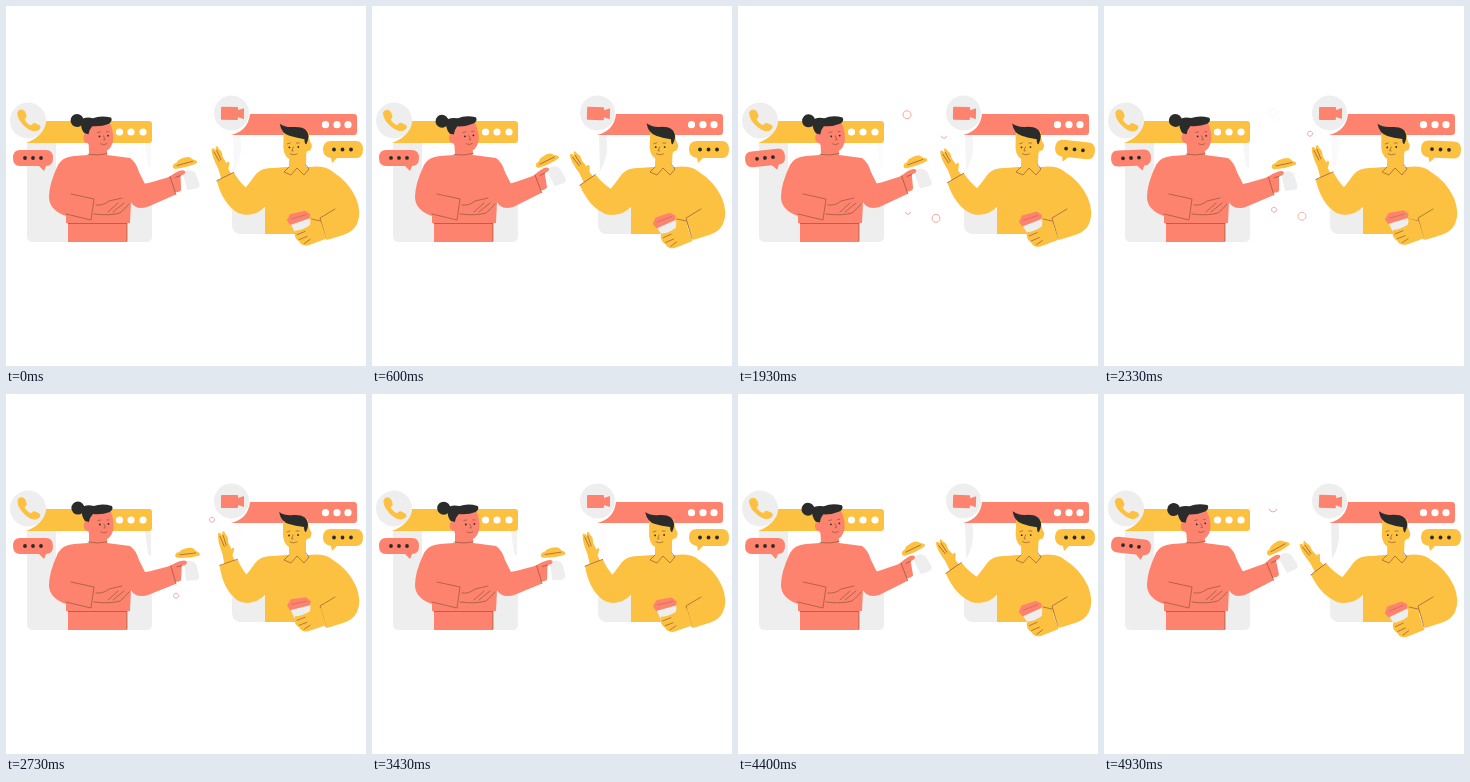
These frames come from a looping animation (360x360 px, 5000 ms). An HTML page:

```html
<!DOCTYPE html>
<html lang="en">
<head>
<meta charset="utf-8">
<title>Coffee call</title>
<style>
  html, body { margin: 0; width: 100%; height: 100%; overflow: hidden; background: #fff; }
  svg { display: block; width: 100vw; height: 100vh; }
  .yellow { fill: #fdc142; }
  .coral { fill: #fd836e; }
  .grey { fill: #eeeeee; }
  .white { fill: #fff; }
  .dark { fill: #2a2b2b; }
  .line { fill: none; stroke: #8a5236; stroke-width: .65; stroke-linecap: round; stroke-linejoin: round; }
  .spark { fill: none; stroke: #f7a79e; stroke-width: 1; }
</style>
</head>
<body>
<svg viewBox="0 0 360 360">
  <!-- call windows -->
  <path class="grey" d="M21 137H50V165H66V236H27Q21 236 21 230ZM122 192H146V230Q146 236 140 236H120Z"/>
  <path class="grey" d="M226 203H262V228H233Q226 226 226 219Z"/>
  <path id="sliver" class="grey" d="M227 129H234Q238 149 228 165Z"/>
  <path id="edge" class="grey" d="M139 137H145V162L142 160Z"/>

  <path class="yellow" d="M20 137Q37 131 40 115H143Q146 115 146 118V134Q146 137 143 137Z"/>
  <path class="coral" d="M225 129Q242 125 244 108H348Q351 108 351 111V126Q351 129 348 129Z"/>
  <g class="white">
    <circle cx="113.5" cy="126" r="3.6"/><circle cx="125" cy="126" r="3.6"/><circle cx="137" cy="126" r="3.6"/>
    <circle cx="319.5" cy="118.7" r="3.6"/><circle cx="331" cy="118.7" r="3.6"/><circle cx="342" cy="118.7" r="3.6"/>
  </g>

  <g id="phone">
    <circle class="grey" cx="22" cy="114.5" r="18"/>
    <path class="yellow" stroke="#fdc142" d="M14 104Q17 103 19 106L20 109Q21 111 18 113Q20 118 25 120Q27 117 29 118L33 120Q35 122 32 124Q27 127 20 121Q12 114 12 107Q12 105 14 104Z"/>
  </g>
  <g id="camera">
    <circle class="grey" cx="225.5" cy="107" r="17.5"/>
    <path class="coral" d="M216 101H231Q232 101 232 102V104L238 102V113L232 111V113Q232 114 231 114H216Q215 114 215 113V102Q215 101 216 101Z"/>
  </g>
  <g id="bubbleL">
    <path class="coral" d="M14 144H40Q47 144 47 152Q47 160 40 160L38 165L33 160H14Q7 160 7 152Q7 144 14 144Z"/>
    <g class="dark"><circle cx="19" cy="152" r="1.9"/><circle cx="27" cy="152" r="1.9"/><circle cx="35" cy="152" r="1.9"/></g>
  </g>
  <g id="bubbleR">
    <path class="yellow" d="M325 135H350Q357 135 357 143.500Q357 152 350 152H331L326 157L325 152Q317 151 317 143.500Q317 135 325 135Z"/>
    <g class="dark"><circle cx="328" cy="143.500" r="1.9"/><circle cx="336.500" cy="143.500" r="1.9"/><circle cx="345" cy="143.500" r="1.9"/></g>
  </g>

  <!-- woman -->
  <g id="armL">
    <g id="handL">
      <g id="cup">
        <path class="grey" d="M178 168Q188 166 191 172L193 183Q193 187 189 187H180Z"/>
        <path class="yellow" d="M174 158L176 156Q184 153 188 155L191 158Q195 159 194 162Q184 165 171 164Q168 162 171 159Z"/>
        <path class="line" d="M174 161L190 159.500"/>
      </g>
      <path class="coral" d="M162 173L170 169Q179 165 181 168Q182 171 176 172L175 186Q174 188 170 188L165 187Z"/>
      <path class="line" d="M171 173L176 172"/>
    </g>
    <path class="coral" d="M128 178Q138 179 145 177L165 172L170 190L142 201Q130 205 123 193Z"/>
    <path class="line" d="M165 172L170 190"/>
  </g>
  <path class="coral" d="M82 149H101L124 152Q130 156 133 166L139 178L142 200Q130 205 125 196L124 217H121V236H62V217H60V210Q43 204 43 191Q43 178 52 159Q56 151 68 150Z"/>
  <path class="line" d="M62 217.500H121M121 218V235M65 188L88 193L85 214L60 208M88 208Q104 210 114 207Q120 202 123 198M90 199Q97 200 103 195L116 192M102 206L112 197M107 206L118 197"/>
  <g id="headL">
    <path class="coral" d="M83 134V149Q92 153 101 149V144Z"/>
    <path class="line" d="M82 148Q92 150 101 148"/>
    <path class="coral" d="M81 118H105Q109 128 107 137Q104 146 97 146Q87 146 82 137Q77 136 78 130Q79 126 82 128Z"/>
    <circle class="dark" cx="72" cy="114" r="6.5"/>
    <path class="dark" d="M76 114Q79 110 88 112Q96 109 106 112Q108 115 104 118Q96 121 87 120Q84 123 83 128L79 127Q75 122 76 114Z"/>
    <circle class="dark" cx="94" cy="130.500" r=".9"/><circle class="dark" cx="102.500" cy="130" r=".9"/>
    <path class="line" d="M92 126.500L95 126M101 126L103 126M98 130L99.500 134L98 134M95 138Q98 140 101 138"/>
  </g>

  <!-- man -->
  <g id="armR">
    <path class="yellow" d="M219 171L217 159Q212 146 213 139Q215 137 217 141Q217 136 219 137L221 141Q223 141 223 148L226 155Q228 152 229 155L227 161L230 168Z"/>
    <path class="line" d="M215 142L219 152M218 141L221 151"/>
    <path class="yellow" d="M214 171L232 165Q236 175 242 182L256 200Q245 214 231 206Q217 195 214 171Z"/>
    <path class="line" d="M214 171L232 165"/>
  </g>
  <path class="yellow" d="M280 161H303Q319 159 327 166Q342 175 350 192Q356 207 351 218Q347 226 337 229L321 234L315 218V228H259V201Q247 212 236 207L235 187Q243 178 250 168Q256 161 268 162Z"/>
  <g id="headR">
    <path class="yellow" d="M283 146V163Q292 168 300 161V143Z"/>
    <path class="yellow" d="M277 125H302Q302 132 304 136Q307 139 304 144L301 145Q297 154 288 155Q278 153 277 142Z"/>
    <path class="dark" d="M273 118Q279 122 287 121Q301 120 302 130Q302 134 300 138Q298 138 298 133Q289 132 283 130Q275 128 273 118Z"/>
    <circle class="dark" cx="283" cy="141.500" r=".9"/><circle class="dark" cx="292" cy="141" r=".9"/>
    <path class="line" d="M281 138L284 137M290 137L293 137M287 141L285.500 145H287M284 148Q287 150 291 148"/>
  </g>
  <path class="line" d="M283 161L278 166L285 169L291 162L298 169L303 163L300 159M329 203L314 212L320 233M305 213L314 215"/>
  <g id="drink">
    <path class="grey" d="M284 214L304 210L307 224L290 228Z"/>
    <path class="coral" d="M281 211L285 205L300 203L305 207L304 211L284 216Z"/>
    <path class="line" stroke-opacity=".5" d="M286 210L301 207"/>
  </g>
  <g id="handR">
    <path class="yellow" d="M289 222Q296 222 304 217L305 211L315 214L320 231L302 237Q295 238 293 233Q287 229 289 222Z"/>
    <path class="line" d="M291 226L299 223M293 231L301 228M298 235L304 231"/>
  </g>
  <g id="sparks"></g>
</svg>
<script>
const LOOP = 5000, SWING = 3800;
const el = id => document.getElementById(id);
const turn = (id, angle, x, y, dy = 0) =>
  el(id).setAttribute('transform', `translate(0 ${dy}) rotate(${angle} ${x} ${y})`);
const bump = (t, centre, width) => Math.exp(-(((t - centre) / width) ** 2));

// x, y at birth, radius, birth time
const sparks = [[169, 114, 4, 850], [169, 114, 4, 4880], [198, 216, 4, 1150],
                [206, 130, 2.5, 1850], [170, 206, 2.5, 1850]];
for (const s of sparks) {
  const path = document.createElementNS('http://www.w3.org/2000/svg', 'path');
  path.setAttribute('class', 'spark');
  s.push(el('sparks').appendChild(path));
}

function drawSpark([x, y, r, born, path], t) {
  const age = t - born;
  const alive = age >= 0 && age < 1500;
  path.style.opacity = alive ? Math.min(1, (1500 - age) / 400) : 0;
  if (!alive) return;
  // the ring opens from its lowest point while it floats up
  const half = Math.min(3.13, 1.2 + age / 170);
  const dx = r * Math.sin(half), dy = r * Math.cos(half), cy = y - age * .005;
  path.setAttribute('d', `M${x - dx} ${cy + dy}A${r} ${r} 0 ${half > Math.PI / 2 ? 1 : 0} 0 ${x + dx} ${cy + dy}`);
}

function draw(t) {
  const low = (1 + Math.cos(2 * Math.PI * (t - 1070) / SWING)) / 2;
  turn('armL', -6 * low, 133, 192);
  turn('handL', -10 * low, 168, 180);
  turn('cup', -8 * low, 182, 165);
  turn('headL', -4 * low, 92, 148);
  turn('armR', -19 * low, 240, 197);
  turn('headR', 2.5 * low, 291, 160);
  turn('drink', -12 * low, 296, 214, 5 * low);
  turn('handR', -4 * low, 315, 222, 5 * low);
  turn('phone', -5 * low, 22, 114);
  turn('camera', 2 * low, 226, 107);
  turn('bubbleL', 6 * bump(t, 4930, 280) - 6 * bump(t, 1930, 380), 27, 152, -bump(t, 1200, 350));
  turn('bubbleR', 6 * bump(t, 1930, 380), 337, 143.5);
  el('sliver').style.opacity = low;
  el('edge').style.opacity = (1 - low) ** 2;
  sparks.forEach(s => drawSpark(s, t));
}

const start = performance.now();
function tick() {
  const t = (performance.now() - start) % LOOP;
  draw(Math.floor(t / 50) * 50);
  requestAnimationFrame(tick);
}
tick();
</script>
</body>
</html>
```
